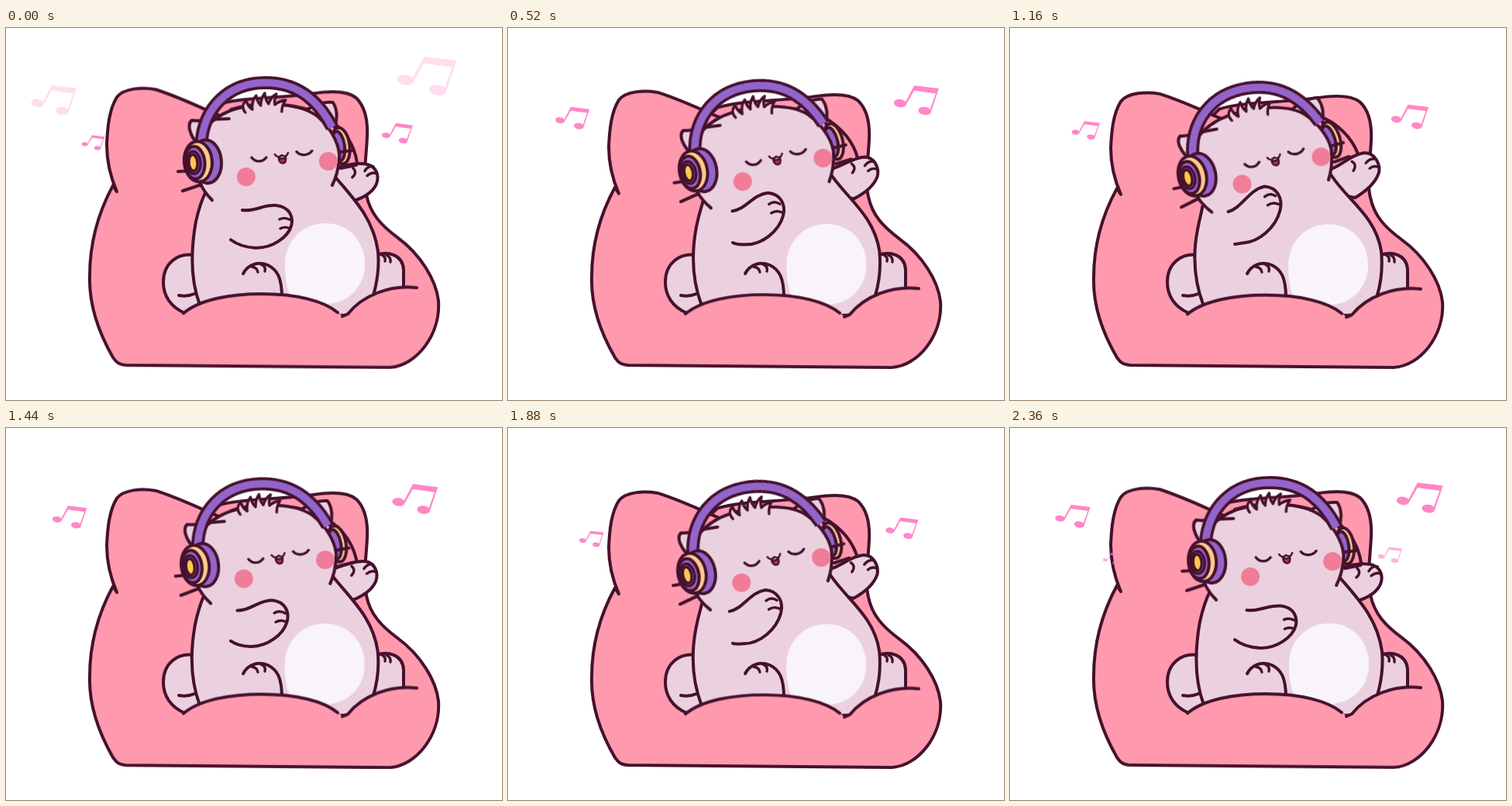
An HTML page for the animation above (2.4 s loop, 640x480 px).

```html
<!DOCTYPE html>
<html lang="en">
<head>
<meta charset="utf-8">
<title>Cat listening to music</title>
<style>
  html, body { margin: 0; width: 100%; height: 100%; overflow: hidden; background: #fff; }
  svg { display: block; width: 640px; height: 480px; }

  .ink { stroke: #45112d; stroke-width: 4; stroke-linecap: round; stroke-linejoin: round; }
  .thin { stroke-width: 3.4; }
  .fine { stroke-width: 2.5; }
  .none { fill: none; }
  .pink { fill: #ff9aae; }
  .fur { fill: #ebd1df; }
  .purple { fill: #9465c9; }
  .cream { fill: #ffcb8c; }
  .gold { fill: #ffc94d; }
  .blush { fill: #f07d97; }
  .band { stroke-width: 17px; }
  .band-inner { stroke: #9465c9; stroke-width: 9.5px; }

  /* Everything sways on one 800 ms beat. */
  .head, .chair, .body, .arm, .fingers, .paw, .pads, .belly {
    animation: 400ms cubic-bezier(.35, .2, .65, .8) -25ms infinite alternate;
  }
  .head { animation-name: tilt; transform-origin: 369px 268px; }
  .chair { animation-name: squash; transform-origin: 320px 438px; }
  .belly { animation-name: sink; }
  .body { animation-name: body; }
  .arm { animation-name: arm; }
  .fingers { animation-name: fingers; }
  .paw { animation-name: paw; }
  .pads { animation-name: pads; }

  @keyframes tilt { from { transform: rotate(.3deg); } to { transform: rotate(-8.6deg); } }
  @keyframes squash { from { transform: scaleY(1); } to { transform: scaleY(.983); } }
  @keyframes sink { from { transform: none; } to { transform: translate(-1px, 1.3px); } }
  @keyframes body {
    from { d: path("M255,375 L250,357 C238,325 238,290 245,250 C249,232 253,220 259,209 L320,150 L400,150 L425,192 C448,219 474,245 480,288 C482,310 480,335 465,370 Z"); }
    to { d: path("M255,375 L250,359 C237,325 236,290 242,260 C245,244 247,239 248,231 L320,170 L395,165 L415,191 C436,223 472,243 479,288 C481,310 480,335 465,370 Z"); }
  }
  @keyframes arm {
    from { d: path("M306,235 C325,237 330,229 350,230 C367,232 372,245 369,256 C365,270 345,285 322,284 C308,283 298,279 290,273"); }
    to { d: path("M281,237 C299,232 308,208 328,204 C344,205 352,219 348,235 C342,258 320,276 301,277 C294,278 292,279 290,279"); }
  }
  @keyframes fingers {
    from { d: path("M354,248 Q361,245 368,249 M355,260 Q361,257 367,260"); }
    to { d: path("M328,217 Q335,211 342,216 M332,228 Q339,223 347,227"); }
  }
  @keyframes paw {
    from { d: path("M430,180 C445,175 458,174 468,177 C479,181 482,192 478,202 C473,213 462,219 449,223 L405,212"); }
    to { d: path("M414,182 C429,177 438,164 456,161 C470,159 478,175 476,186 C472,199 460,210 445,219 L400,210"); }
  }
  @keyframes pads {
    from { d: path("M448,181 Q454,187 447,193 M463,185 Q467,178 474,179 M466,191 Q472,186 478,188"); }
    to { d: path("M441,172 Q448,176 443,184 M459,174 Q465,167 472,169 M464,181 Q470,176 476,180"); }
  }
</style>
</head>
<body>
<svg viewBox="0 0 640 480">
  <defs>
    <g id="note" fill="#ff87c7">
      <ellipse cx="-28" cy="5" rx="10.5" ry="6.8" transform="rotate(8 -28 5)"/>
      <ellipse cx="14" cy="18" rx="11" ry="6.8" transform="rotate(8 14 18)"/>
      <path d="M-4,-25 L38,-20 L24.5,20 L21.5,19 L32.5,-11.5 L-4,-16.5 L-18,8 L-20.5,6.500 Z"/>
    </g>
    <path id="arc" d="M252,150 C255,102 288,70.500 335,70.500 C380,70.500 405,97 421,128"/>
  </defs>

  <g class="chair ink">
    <path class="pink" d="M138,203 L143,211 C134,190 130,170 130,150 C131,128 133,105 143,89
      C152,77 176,76 193,79 C218,87 240,97 262,107 L270,99 C300,89 350,91 398,84
      C418,81 440,80 452,90 C464,102 467,120 466,140 C465,165 460,195 465,215
      C470,240 485,255 505,270 C535,292 555,325 558,352 C561,395 530,436 495,438
      L155,435 C145,434 142,431 138,425 C118,390 107,355 108,320 C108,280 118,240 138,203 Z"/>
    <path class="none" d="M262,107 L281,115 M290,105 C330,92 385,98 415,116 C438,132 450,152 453,174"/>
  </g>

  <g class="ink">
    <path class="fur" d="M242,293 C222,290 203,303 203,328 C203,345 212,360 231,368 L252,366 Z"/>
    <path class="none" d="M223,345 Q234,347 243,343"/>
    <path class="fur" d="M476,294 C492,287 512,292 513,312 L513,345 L470,350"/>
    <path class="none thin" d="M483,292 Q491,295 489,301 M491,293 Q497,296 496,302"/>
    <path class="fur paw"/>
    <path class="none thin pads"/>
  </g>

  <g class="head ink">
    <path class="fur" d="M388,106 C398,99 411,95 422,96 C428,105 428,118 424,128"/>
    <path class="fur" d="M248,150 C238,140 233,124 240,119 C258,121 270,118 280,114"/>
    <g transform="rotate(-8 432 152)">
      <ellipse class="cream" cx="432" cy="152" rx="11.500" ry="23.500"/>
      <ellipse class="purple" cx="429" cy="152" rx="8" ry="19"/>
    </g>
  </g>

  <path class="ink fur body"/>

  <g class="head ink">
    <path class="fur" d="M266,222 C260,216 254,208 250,199 C240,180 244,150 256,132
      C268,114 290,104 312,101 C340,97 380,97 402,114 C422,131 432,155 430,170 C429,182 426,193 421,203"/>
    <path class="none" d="M262,118 L288,117 M222,185 L240,184 M228,210 L252,202 M432,160 L447,158 M432,181 L452,177"/>
    <path class="fur thin" d="M309,109 C304,103 306,97 310,93 Q312,101 318,105 Q317,94 323,87
      Q324,95 329,100 Q329,91 334,84 Q335,93 339,98 Q342,89 349,85 Q346,92 347,99
      Q353,94 361,93 Q356,100 356,108"/>
    <g stroke="none">
      <circle class="blush" cx="310" cy="192" r="12"/>
      <circle class="blush" cx="416" cy="172" r="12"/>
    </g>
    <path class="none thin" d="M317,167 C322,173.500 331,173.500 336,167 M375,159.500 C380,165.500 390,165 395,158.500"/>
    <path class="fine" fill="#b8323a" d="M352,168 Q357,169.500 361,167 Q362,174.500 357,174.500 Q352.500,174 352,168 Z"/>
    <path class="none fine" d="M347,163 Q351,169 356,164 Q362,168 364,161"/>

    <g fill="none" stroke-linecap="butt">
      <use href="#arc" class="band"/>
      <use href="#arc" class="band-inner"/>
    </g>
    <g transform="rotate(-5 250 172)">
      <ellipse class="purple" cx="259" cy="173" rx="19" ry="28"/>
      <ellipse class="cream" cx="248" cy="172" rx="18" ry="26"/>
      <ellipse class="purple" cx="243.500" cy="173" rx="13" ry="21"/>
      <ellipse class="purple thin" cx="242" cy="173" rx="9" ry="14.500"/>
      <ellipse class="gold thin" cx="241.500" cy="173" rx="5.500" ry="10.500"/>
    </g>
  </g>

  <path class="belly" fill="#f8f4fa" d="M412,252 C442,252 463,275 463,305 C463,335 440,356 412,356
    L372,356 C362,340 360,322 360,305 C360,275 382,252 412,252 Z"/>
  <g class="ink">
    <path class="fur arm"/>
    <path class="none thin fingers"/>
    <path class="fur" d="M306,317 C312,305 325,301 338,306 C350,312 356,322 356,348"/>
    <path class="none thin" d="M317,308 Q324,309 325,315 M329,305 Q336,308 334,314"/>
  </g>

  <g class="chair">
    <path class="pink" d="M229,368 C250,350 290,343 330,343 C375,343 410,352 428,367
      L435,372 L441,369 C460,345 495,331 530,335 L535,400 L220,410 Z"/>
    <path class="ink none" d="M229,368 C250,350 290,343 330,343 C375,343 410,352 428,367
      M434,372 L441,369 C460,345 495,331 530,335"/>
  </g>
  <g id="notes"></g>
</svg>
<script>
  const LOOP = 2400, BEAT = 900, BORN = -352, FADE = 700, GONE = 980;
  const streams = [
    { x: 505, y: 136, vx: .0425, vy: -.082, size: .523, grow: .00072 },
    { x: 112.5, y: 148, vx: -.056, vy: -.061, size: .39, grow: .00075 }
  ];
  const layer = document.getElementById('notes');
  const notes = [];
  for (const stream of streams) {
    for (let k = -1; k <= 3; k++) {
      const el = document.createElementNS('http://www.w3.org/2000/svg', 'use');
      el.setAttribute('href', '#note');
      layer.append(el);
      notes.push({ el, stream, start: k * BEAT });
    }
  }

  const clamp = v => Math.max(0, Math.min(1, v));

  function place({ el, stream: s, start }, t) {
    const age = t - start;
    const x = s.x + s.vx * age, y = s.y + s.vy * age;
    const scale = s.size * Math.exp(s.grow * age);
    const fadeIn = clamp((age - BORN) / 20);
    const fadeOut = clamp((GONE - age) / (GONE - FADE));
    el.setAttribute('transform', `translate(${x} ${y}) scale(${scale})`);
    el.setAttribute('opacity', fadeIn * fadeOut);
  }

  const begin = performance.now();
  function draw() {
    const t = (performance.now() - begin) % LOOP;
    notes.forEach(n => place(n, t));
    requestAnimationFrame(draw);
  }
  draw();
</script>
</body>
</html>
```
